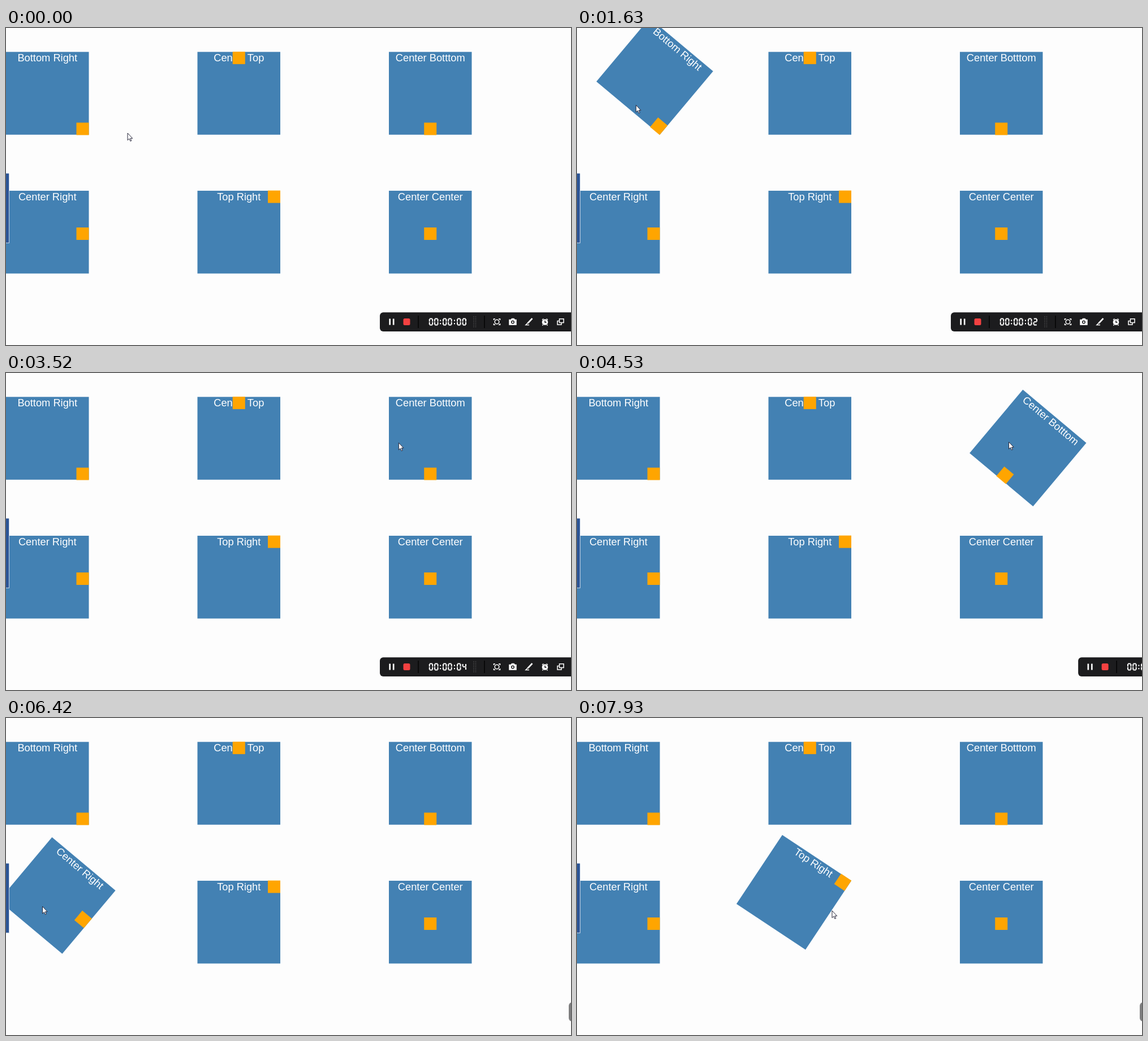
Animation, 999 px wide and 561 px high, one loop 8 s. Source, as an HTML page:

```html
<!DOCTYPE html>
<html lang="en">
<head>
<meta charset="utf-8">
<title>Transform origins</title>
<style>
  html, body { margin: 0; width: 100%; height: 100%; overflow: hidden; background: #fdfdfd; }
  svg { display: block; width: 999px; height: 561px; }
  text { font: 18.3px "Liberation Sans", Arial, sans-serif; fill: #fff; text-anchor: middle; }
</style>
</head>
<body>
<svg viewBox="0 0 999 561">
  <rect width="999" height="561" fill="#fdfdfd"/>
  <g id="boxes"></g>
  <g id="side">
    <rect x="-2" y="257.5" width="8" height="123.3" fill="#c9d5e6"/>
    <rect x="-2" y="257.5" width="7" height="122.3" fill="#2c5596"/>
  </g>
  <g id="bar">
    <rect x="661" y="503.3" width="360" height="33.7" rx="6" fill="#1c1c1e"/>
    <path d="M678.7 514.5V525.5M685.2 514.5V525.5" stroke="#fff" stroke-width="2.6"/>
    <rect x="702.5" y="514" width="12" height="12" rx="2.5" fill="#f44141"/>
    <path d="M729 509V531M846 509V531" stroke="#050505" stroke-width="1.6"/>
    <path d="M827 510V531M830.5 510V531" stroke="#48484a" stroke-width="1.5" stroke-dasharray="1.5 1.5"/>
    <path id="clock" fill="none" stroke="#fff" stroke-width="2"/>
    <g fill="none" stroke="#fff" stroke-width="1.5">
      <circle cx="868" cy="520" r="3.8"/>
      <path d="M862.5 517V514.7H865M871 514.7H873.5V517M873.5 523V525.3H871M865 525.3H862.5V523"/>
      <path d="M890 516.5H893L894.5 514.5H898L899.5 516.5H902V525H890Z" fill="#fff"/>
      <circle cx="896" cy="520.5" r="2.3" stroke="#1c1c1e" fill="#fff"/>
      <path d="M930.5 514L922.5 522.5" stroke-width="2.6"/>
      <path d="M922.5 522L919 525.5H925"/>
      <circle cx="953" cy="520.5" r="4.6" fill="#fff"/>
      <path d="M948 516.5L950.5 514.5M958 516.5L955.5 514.5M949.5 525L948.5 526.5M956.5 525L957.5 526.5"/>
      <path d="M953 517.8V521H955.5" stroke="#1c1c1e"/>
      <path d="M978.5 514.8H986V521.5H978.5ZM978 518.5H975V525H982V522"/>
    </g>
  </g>
  <path id="cursor" d="M0 0V12.6L2.9 9.9L4.9 14.3L6.8 13.5L4.9 9.3H8.7Z" fill="#fff" stroke="#26263a" stroke-width="1"/>
</svg>
<script>
const LOOP = 8000, HOLD = 500, STEP = 125.93;
const SIZE = 146.5, DOT = 22, TURN = 40, RISE = 1000;
const $ = id => document.getElementById(id);
const NS = "http://www.w3.org/2000/svg";

// label, column, row, origin (0..1), hover start and end
const specs = [
  ["Bottom Right", 0, 0, 1, 1, 620, 2010],
  ["Center Top", 1, 0, .5, 0, 2185, 3200],
  ["Center Botttom", 2, 0, .5, 1, 3530, 4840],
  ["Center Right", 0, 1, 1, .5, 5380, 7080],
  ["Top Right", 1, 1, 1, 0, 7390, LOOP],
  ["Center Center", 2, 1, .5, .5, LOOP, LOOP]
];

// time, x, y
const track = [
  [500, 215, 186], [620, 146, 157], [900, 108, 139], [1630, 104, 136.5],
  [1850, 125, 132], [2010, 205, 121], [2185, 338, 109], [2640, 417.5, 105.5],
  [3120, 440, 108], [3200, 500, 111], [3400, 650, 119], [3520, 694, 123.5],
  [3900, 750, 122], [4530, 763.5, 122], [4780, 763, 123], [5100, 480, 212],
  [5380, 146, 312], [5600, 72, 332], [6420, 64.5, 333.5], [6850, 70, 334],
  [7080, 170, 336], [7390, 338, 338], [7650, 425, 340], [7930, 451, 341]
];

// CSS "ease": cubic-bezier(.25, .1, .25, 1)
function ease(x) {
  if (x <= 0) return 0;
  if (x >= 1) return 1;
  const bez = (a, b, u) => 3 * a * u * (1 - u) ** 2 + 3 * b * u * u * (1 - u) + u ** 3;
  let lo = 0, hi = 1;
  for (let i = 0; i < 24; i++) {
    const mid = (lo + hi) / 2;
    if (bez(.25, .25, mid) < x) lo = mid; else hi = mid;
  }
  return bez(.1, 1, lo);
}

function add(parent, name, attrs) {
  const el = document.createElementNS(NS, name);
  for (const k in attrs) el.setAttribute(k, attrs[k]);
  return parent.appendChild(el);
}

const boxes = specs.map(([label, col, row, ox, oy, start, end]) => {
  const x = col * 338.5, y = row ? 288 : 42.3;
  const g = add($("boxes"), "g", {});
  add(g, "rect", { x, y, width: SIZE, height: SIZE, fill: "#4381b3" });
  add(g, "text", { x: x + SIZE / 2, y: y + 16.7 }).textContent = label;
  const dy = oy === .5 ? 65 : oy ? 125.2 : -.4;
  add(g, "rect", { x: x + ox * (SIZE - DOT), y: y + dy, width: DOT, height: DOT, fill: "#ffa500" });
  return { g, px: x + ox * SIZE, py: y + oy * SIZE, start, end };
});

function cursorAt(t) {
  let i = track.findIndex(p => p[0] > t);
  if (i === 0) return track[0].slice(1);
  if (i < 0) return track[track.length - 1].slice(1);
  const a = track[i - 1], b = track[i], f = (t - a[0]) / (b[0] - a[0]);
  return [a[1] + (b[1] - a[1]) * f, a[2] + (b[2] - a[2]) * f];
}

// Seven segments a..g inside a 7 x 13 cell
const segments = ["M1 1H6", "M6.2 1.6V5.9", "M6.2 7.1V11.4", "M1 12H6", "M.8 7.1V11.4", "M.8 1.6V5.9", "M1.4 6.5H5.6"];
const lit = ["abcdef", "bc", "abdeg", "abcdg", "bcfg", "acdfg"];
const cells = [748, 757.3, 772.2, 781.5, 797.3, 806.8];

function digit(n, x) {
  return [...lit[n]].map(c => segments["abcdefg".indexOf(c)]
    .replace(/M([\d.]+) ([\d.]+)([HV])([\d.]+)/, (_, a, b, cmd, v) =>
      `M${x + +a} ${513.5 + +b}${cmd}${+v + (cmd === "H" ? x : 513.5)}`)).join("");
}

function clockPath(sec) {
  const colons = [768.2, 793].map(x => `M${x} 516.5v2.2M${x} 522v2.2`).join("");
  return colons + cells.map((x, i) => digit(i === 5 ? sec : 0, x)).join("");
}

function draw(now) {
  const real = now % LOOP;
  const t = real < HOLD ? 0 : HOLD + Math.floor((real - HOLD + 8) / STEP) * STEP;
  for (const b of boxes) {
    const over = t >= b.start && t < b.end;
    const a = over ? TURN * ease((t - b.start) / RISE) : 0;
    b.g.setAttribute("transform", `rotate(${a} ${b.px} ${b.py})`);
  }
  const [x, y] = cursorAt(t);
  $("cursor").setAttribute("transform", `translate(${x} ${y})`);

  const sec = t < HOLD ? 0 : Math.min(5, 1 + Math.floor((t - HOLD + 8) / 1000));
  $("clock").setAttribute("d", clockPath(sec));

  const ramp = (from, to) => Math.max(0, Math.min(1, (t - from) / (to - from)));
  $("bar").setAttribute("transform", `translate(${334 * ramp(4250, 4665)} 0)`);
  $("bar").setAttribute("opacity", 1 - .44 * ramp(4800, 5300));
}

let origin;
function tick(now) {
  origin ??= now;
  draw(Math.max(0, now - origin));
  requestAnimationFrame(tick);
}
draw(0);
requestAnimationFrame(tick);
</script>
</body>
</html>
```
